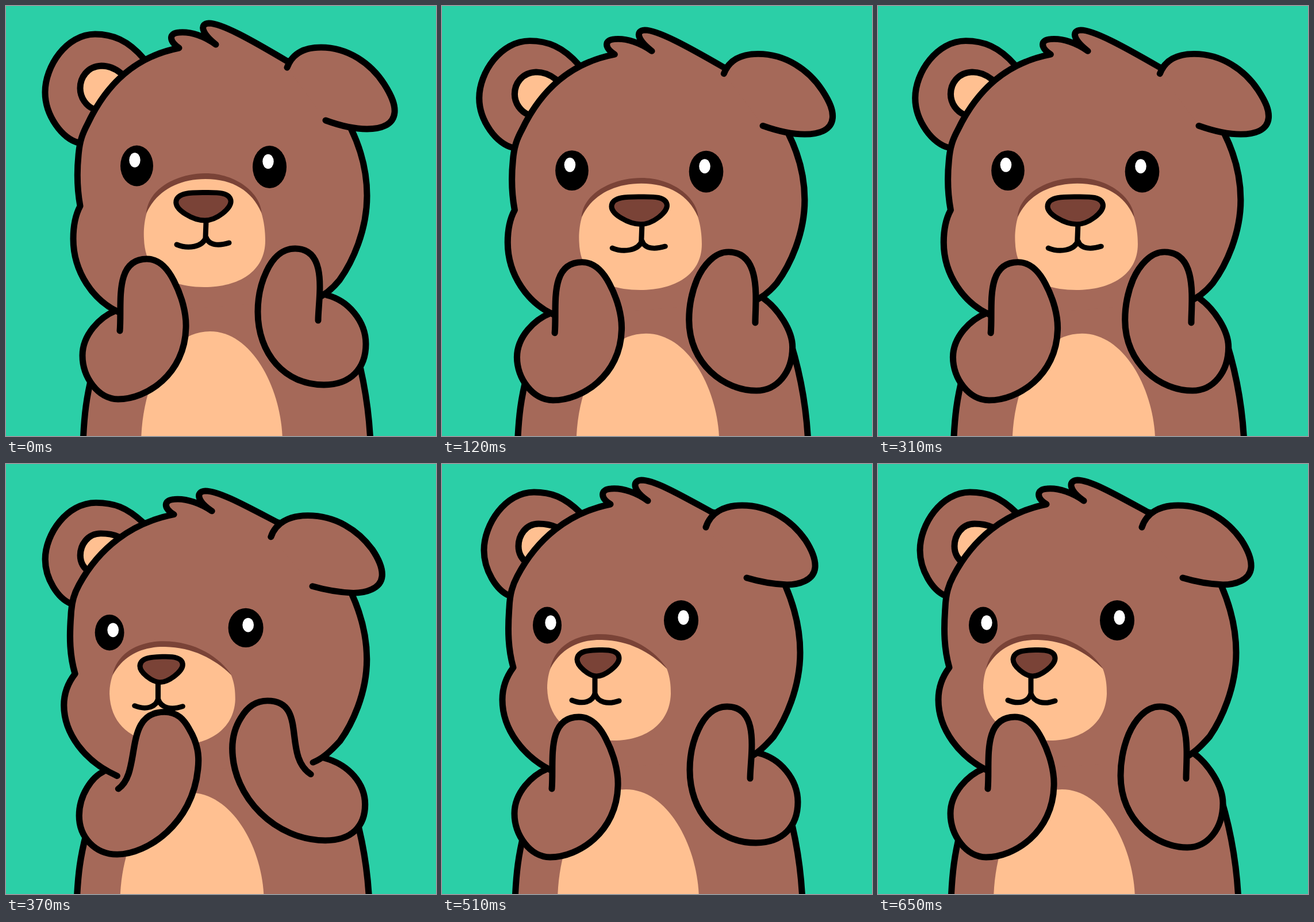
Animation, 748 px wide and 748 px high, one loop 0.67 s. Source, as an HTML page:

```html
<!DOCTYPE html>
<html lang="en">
<head>
<meta charset="utf-8">
<title>Clapping bear</title>
<style>
  html, body { margin: 0; width: 100%; height: 100%; overflow: hidden; background: #2bcfa7; }
  svg { display: block; width: 100vw; height: 100vh; }
  .line { fill: none; stroke: #000; stroke-width: 11; stroke-linecap: round; stroke-linejoin: round; }
  .thin { stroke-width: 9; }
  .fur { fill: #a56959; }
  .cream { fill: #ffc091; }
  .dark { fill: #7a4337; }
</style>
</head>
<body>
<svg viewBox="0 0 748 748">
  <g id="bear">
    <g id="back"></g>
    <g id="arms"></g>
  </g>
</svg>
<script>
const $ = id => document.getElementById(id);

const views = {
  front: {
    cx: 366, shift: 0,
    ear: 'M240 92C212 59 185 49 155 49C105 49 68 105 68 150C68 190 98 232 127 238',
    inner: 'M200 117C188 107 178 104 166 104C141 105 129 125 129 143C129 160 140 174 152 179',
    belly: 'M235 760C236 660 280 566 355 566C430 566 481 670 481 760Z',
    head: 'M204 536C150 515 117 460 117 405C117 383 121 363 129 348C124 320 123 290 126 260C128 235 133 222 142 205C175 135 225 88 301 73C282 60 284 47 301 46C322 44 346 53 365 67C340 47 336 31 353 30C375 30 425 58 489 96L520 95L600 160L600 213C618 250 628 290 628 330C628 390 603 445 580 477C567 493 555 503 538 510',
    flap: 'M489 107C498 82 520 72 548 72C595 72 635 100 658 136C672 158 677 172 676 185C674 208 650 214 628 214C602 214 578 207 556 199',
    shade: 'M244 361C246 320 295 291 347 291C400 291 443 325 445 361C428 330 395 311 347 311C300 311 262 330 244 361Z',
    muzzle: 'M240 405C239 390 241 372 245 359C262 322 300 301 347 301C395 301 428 322 444 359C449 375 451 392 451 408C451 462 405 489 345 489C285 489 242 465 240 405Z',
    nose: 'M296 339C299 324 325 324.500 344 324.500C365 324.500 388 323 391 338C393 352 366 373 346 373C326 373 293 355 296 339Z',
    mouth: 'M348 376L347 403M297 415C316 423 342 420 348 402C353 418 372 417 388 412',
    eyes: [[227.5, 278, 28.5, 35.5, -3.5, -10], [458.5, 280, 29.5, 37, -2.5, -9.5]]
  },
  side: {
    cx: 351, shift: -7,
    ear: 'M240 84C212 57 190 49 160 49C110 49 73 105 73 150C73 185 95 220 117 229',
    inner: 'M199 110C188 105 180 104 168 104C145 104 133 125 133 143C133 157 140 166 146 170',
    belly: 'M201 760C202 660 245 566 320 566C395 566 447 670 447 760Z',
    head: 'M196 536C140 510 105 460 105 410C105 388 112 370 124 354C115 322 114 290 117 250C118 225 123 210 131 195C165 130 220 85 293 70C274 58 276 44 294 43C315 41 340 51 358 64C332 46 330 29 347 28C370 28 415 54 470 84L500 90L590 150L597 211C614 250 623 288 623 328C623 390 597 445 577 474C562 491 548 505 531 512',
    flap: 'M459 110C467 85 490 72 522 72C570 72 608 98 632 132C645 152 650 168 649 180C647 203 620 210 600 210C575 209 550 204 530 198',
    shade: 'M188 357C196 315 235 296 275 296C330 296 372 325 392 357C362 335 325 316 278 316C240 316 208 330 188 357Z',
    muzzle: 'M183 390C183 375 186 362 189 355C208 320 240 305 278 306C325 307 362 327 391 356C397 372 398 385 398 400C396 455 350 481 300 481C235 481 185 455 183 390Z',
    nose: 'M235 340C236 324 258 324 275 323.500C292 323 308 325 308 338C308 350 283 370 268 369C255 368 235 352 235 340Z',
    mouth: 'M266 372L266 400M226 411C245 419 262 414 266 399C271 415 288 419 308 412',
    eyes: [[183, 280.5, 25, 32, 6, -4.5], [416, 272, 30, 35, 4, -5]]
  }
};

// Each arm: thumb-side tip, fingertips, palm, elbow, shoulder
const leftArm = {
  open: 'M198 565C202 520 187 440 245 440C266 440 281 456 292 478C306 505 314 535 313 560C311 640 245 684 195 684C160 684 133 645 133 608C133 572 163 541 191 530',
  reach: 'M205 559C246 530 212 422 284 422C307 422 318 437 326 452C341 478 344 500 341 525C332 620 255 676 203 676C165 676 138 645 138 607C138 570 160 538 180 528',
  clap: 'M233 549C328 495 297 400 346 400C362 400 372 404 380 411C379 460 377 515 375 566C323 631 258 682 202 682C156 682 125 645 125 605C126 569 152 541 184 526'
};
const rightArm = {
  open: 'M543 547C543 510 562 422 503 422C478 422 462 442 453 462C442 485 438 510 438 532C438 605 485 659 553 659C600 659 626 630 626 588C626 548 595 512 558 503',
  low: 'M543 547C543 510 555 422 497 422C472 422 453 447 443 470C434 492 429 518 429 542C429 620 490 667 545 667C580 667 607 635 607 590C607 560 582 522 556 503',
  reach: 'M534 533C485 500 530 402 460 402C438 402 424 416 415 432C404 450 400 470 400 487C400 575 475 651 559 651C605 651 627 625 627 587C627 550 600 516 557 504',
  clap: 'M520 549C448 505 455 400 406 400C394 400 388 404 380 411C379 460 377 515 375 566C410 620 475 675 545 675C595 675 624 640 624 590C624 556 592 517 560 503'
};

const shape = (d, cls) => `<path class="${cls}" d="${d}"/>`;
const inked = (d, cls, pen = 'line') => shape(d, cls) + shape(d, pen);
const oval = (x, y, rx, ry, fill) =>
  `<ellipse cx="${x}" cy="${y}" rx="${rx}" ry="${ry}" fill="${fill}"/>`;
const eye = ([x, y, rx, ry, dx, dy]) =>
  oval(x, y, rx, ry, '#000') + oval(x + dx, y + dy, 9.7, 12.7, '#fff');

function drawBack(v) {
  return inked(v.ear, 'fur') + inked(v.inner, 'cream') +
    `<g transform="translate(${v.shift})">` +
    shape('M134 760C136 710 140 680 150 640L172 538L200 500L548 495L597 560C617 620 631 690 634 760Z', 'fur') +
    shape('M134 760C136 710 140 680 150 640M597 560C617 620 631 690 634 760', 'line') + '</g>' +
    shape(v.belly, 'cream') + inked(v.head, 'fur') + inked(v.flap, 'fur') +
    shape(v.shade, 'dark') + shape(v.muzzle, 'cream') +
    inked(v.nose, 'dark', 'line thin') + shape(v.mouth, 'line thin') +
    v.eyes.map(eye).join('');
}

const nums = d => d.match(/[\d.]+/g).map(Number);

function blend(a, b, u) {
  const end = nums(b);
  let i = 0;
  return a.replace(/[\d.]+/g, n => +n + (end[i++] - n) * u);
}

function drawArm(d) {
  const p = nums(d), sx = p[p.length - 2];
  return shape(`${d}Q${sx} ${p[1]} ${p[0]} ${p[1]}Z`, 'fur') + shape(d, 'line');
}

const squash = [0, 0.024, 0.058, 0.0892, 0.0762, 0.045, 0.0153, 0];

function armPose(arm, beat) {
  if (beat === 0) return arm.open;
  if (beat === 1) return arm.reach;
  if (beat === 2) return blend(arm.reach, arm.clap, 0.55);
  if (beat === 3) return arm.clap;
  return arm.low || arm.open;
}

// Steps of 20 ms, with one longer hold on the second clap
const stepAt = t => t < 220 ? Math.floor(t / 20) : t < 270 ? 11 : 12 + Math.floor((t - 270) / 20);

let lastStep = -1, lastView = null;

function render(t) {
  const step = stepAt(t);
  if (step === lastStep) return;
  lastStep = step;
  const v = step < 16 ? views.front : views.side;
  const beat = step % 8, k = squash[beat], sx = 1 + 0.72 * k;
  if (v !== lastView) {
    $('back').innerHTML = drawBack(v);
    lastView = v;
  }
  $('bear').setAttribute('transform', `matrix(${sx} 0 0 ${1 - k} ${v.cx * (1 - sx)} ${810 * k})`);
  $('arms').setAttribute('transform', `translate(${v.shift})`);
  $('arms').innerHTML = drawArm(armPose(leftArm, beat)) + drawArm(armPose(rightArm, beat));
}

const start = performance.now();
function tick() {
  render((performance.now() - start) % 670);
  requestAnimationFrame(tick);
}
tick();
</script>
</body>
</html>
```
